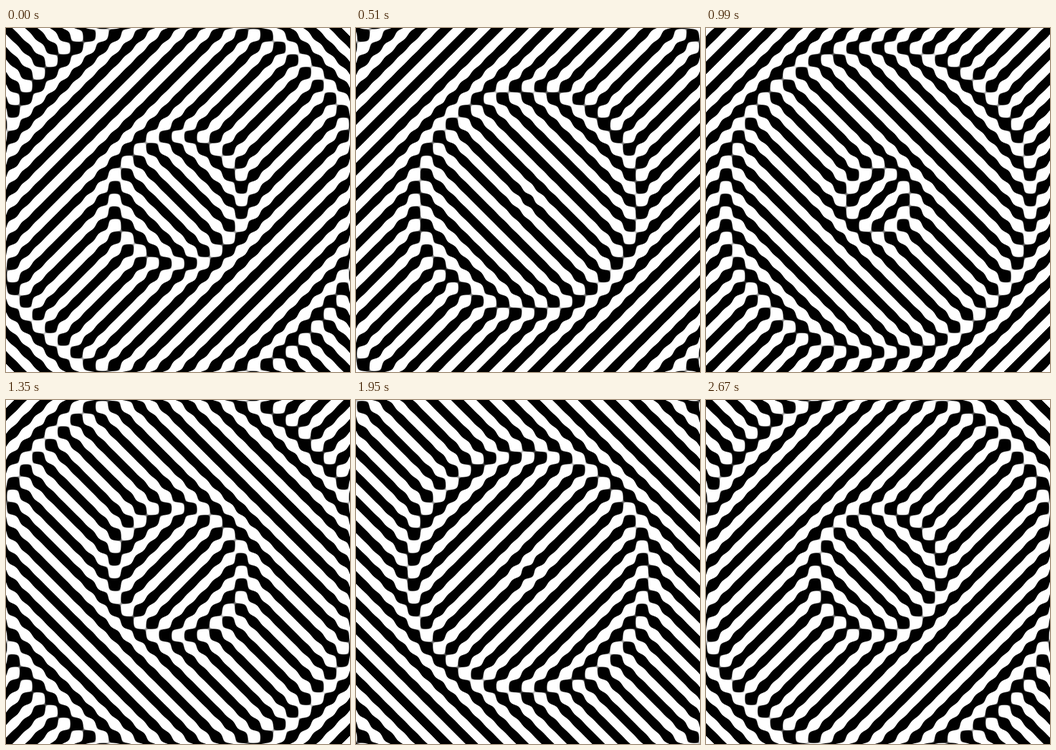
An HTML page with a canvas that plays this animation: 480x480 px, repeating every 2.7 s.

```html
<!DOCTYPE html>
<html>
<head>
<meta charset="utf-8">
<style>
  html, body { margin: 0; height: 100%; overflow: hidden; background: #000; }
  canvas { display: block; }
</style>
</head>
<body>
<canvas id="stage" width="480" height="480"></canvas>
<script>
const SIZE = 480, LOOP = 2700, STEP = 30;
const CELL = 25 / Math.SQRT2;            // side of one checker square
const WAVE = SIZE / Math.SQRT2;          // radial wavelength
const START = 0.265;                     // first zero of the wave, in wavelengths
const SHARP = CELL / Math.PI;            // one pixel of edge softness

const ctx = document.getElementById('stage').getContext('2d');
const image = ctx.createImageData(SIZE, SIZE);
const pixels = new Uint32Array(image.data.buffer);

// value = checker + wave * cross, with the wave split into cos and sin of time
const count = SIZE * SIZE;
const checker = new Float32Array(count);
const cosPart = new Float32Array(count);
const sinPart = new Float32Array(count);

for (let i = 0; i < count; i++) {
  const x = i % SIZE + 0.5 - SIZE / 2;
  const y = Math.floor(i / SIZE) + 0.5 - SIZE / 2;
  const u = x * Math.PI / CELL, v = y * Math.PI / CELL;
  const phase = 2 * Math.PI * (Math.hypot(x, y) / WAVE - START + 0.25);
  const cross = Math.sin(u) * Math.sin(v) * SHARP;
  checker[i] = Math.cos(u) * Math.cos(v) * SHARP;
  cosPart[i] = cross * Math.cos(phase);
  sinPart[i] = cross * Math.sin(phase);
}

function draw(now) {
  const time = Math.floor(now % LOOP / STEP) * STEP;
  const angle = 2 * Math.PI * time / LOOP;
  const c = Math.cos(angle), s = Math.sin(angle);
  for (let i = 0; i < count; i++) {
    const value = checker[i] + cosPart[i] * c + sinPart[i] * s;
    const grey = Math.max(0, Math.min(255, 127.5 - 255 * value)) | 0;
    pixels[i] = 0xff000000 | grey * 0x010101;
  }
  ctx.putImageData(image, 0, 0);
}

const begin = performance.now();
function tick() {
  draw(performance.now() - begin);
  requestAnimationFrame(tick);
}
tick();
</script>
</body>
</html>
```
